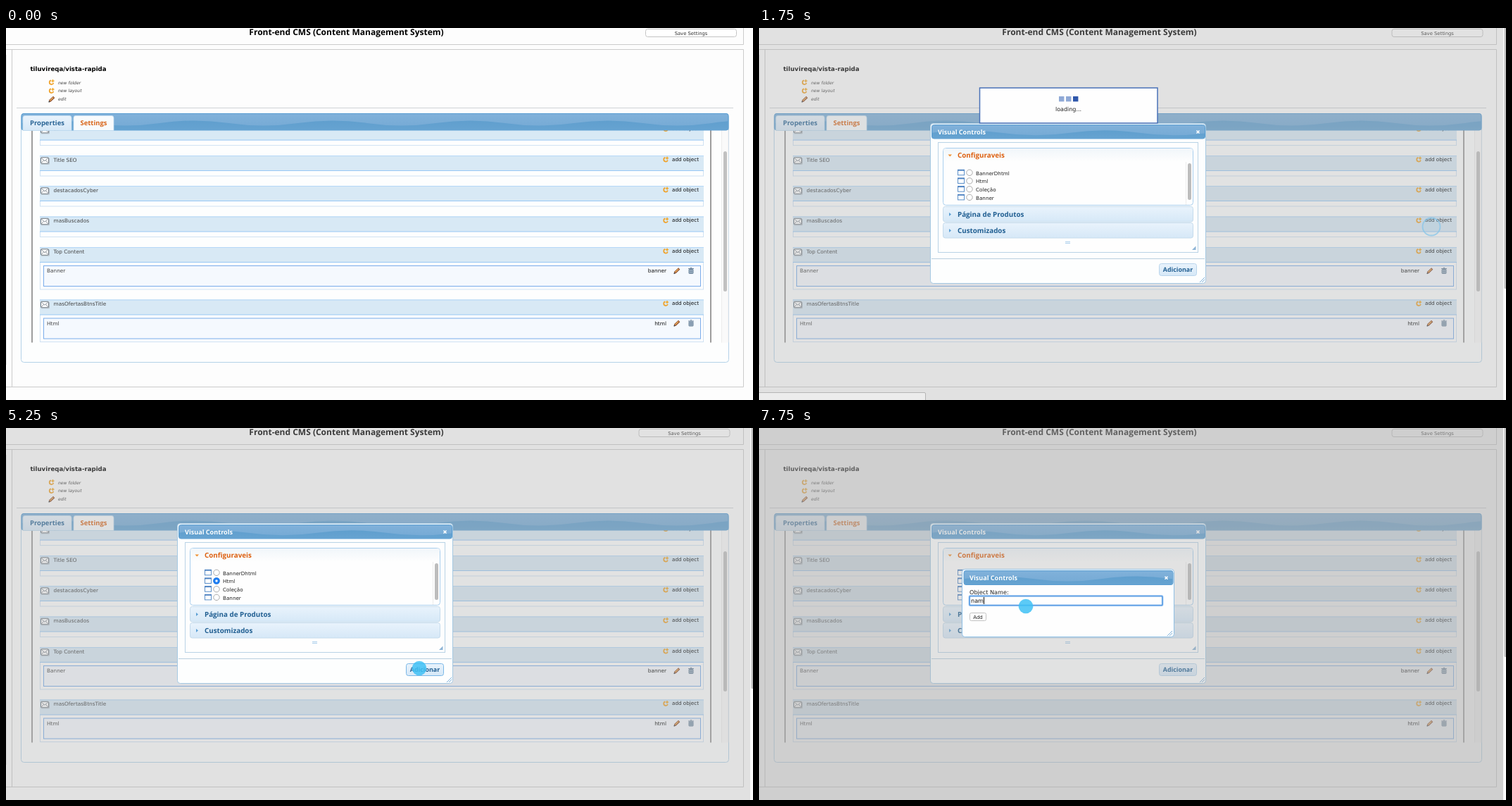
Recreate the animation shown at these times as an HTML page. Size 1061 by 528 pixels, loop 8000 ms.

```html
<!DOCTYPE html>
<html lang="en">
<head>
<meta charset="utf-8">
<title>CMS settings</title>
<style>
  html, body { margin: 0; width: 100%; height: 100%; overflow: hidden; background: #fdfdfd; }
  svg { display: block; }
  text { font-family: "DejaVu Sans", sans-serif; text-rendering: geometricPrecision; white-space: pre; }
  .b { font-weight: bold; }
  .i { font-style: italic; }
  .ui { font-family: "Open Sans", "Noto Sans", sans-serif; font-weight: bold; }
  .end { text-anchor: end; }
  .mid { text-anchor: middle; }
</style>
</head>
<body>
<svg id="stage" width="1061" height="528" viewBox="0 0 1061 528"></svg>
<script>
const LOOP = 8000, STEP = 250;

// Drawing helpers
const rect = (x, y, w, h, fill, stroke = 'none', r = 0, extra = '') =>
  `<rect x="${x}" y="${y}" width="${w}" height="${h}" rx="${r}" fill="${fill}" stroke="${stroke}" ${extra}/>`;
const path = (d, stroke, width = 1, fill = 'none') =>
  `<path d="${d}" fill="${fill}" stroke="${stroke}" stroke-width="${width}"/>`;
const text = (x, y, s, size, cls = '', fill = '#111', extra = '') =>
  `<text x="${x}" y="${y}" font-size="${size}" class="${cls}" fill="${fill}" ${extra}>${s}</text>`;
const at = (x, y, body) => `<g transform="translate(${x} ${y})">${body}</g>`;
const group = (id, body) => `<g id="${id}">${body}</g>`;

// Icons, centred on x, y
const spark = (x, y) => at(x, y,
  path('M-.6-2.6A2.9 2.9 0 1 0 2.9 1', '#f0a32c', 1.7) +
  path('M2-4V.2M-.1-1.9H4.1', '#f2a51f', 1.3));
const pencil = (x, y) => at(x, y,
  path('M-3.2 3L3.2-3', '#8a4a2c', 3.2) + path('M-2.6 2.2L2.3-2.4', '#f0b25e', 1.4) +
  path('M-4.3 4.2L-3 3', '#222', 1.4));
const trash = (x, y) => at(x, y,
  rect(-3, -2, 6, 6, '#a9bccd', '#6b8299', .6) + path('M-4-3H4M-1.2-4.2H1.2M-1-1V3M1-1V3', '#637c95', .9));
const mail = (x, y) => at(x, y,
  rect(-5.5, -4, 11, 8.5, '#fff', '#69727b', 1) + path('M-5-3.5L0 1L5-3.5M-5 4L-1.5 0M5 4L1.5 0', '#7b848d', .9) +
  path('M-5 5.4H6.3V-3', '#aab1b8', .8));
const cross = (x, y) => path(`M${x - 2} ${y - 2}l4 4m0-4l-4 4`, '#fff', 1.5);
const grip = (x, y) => path(`M${x - 4} ${y + 4}l7-7M${x - 1} ${y + 4}l4-4`, '#6fa8d6', .9);

// Blue title bar with a glossy wave
function bar(x, y, w, h) {
  let wave = `M0 ${h * .55}q49 -7 98 0`;
  for (let i = 98; i < w; i += 98) wave += 't98 0';
  return rect(x, y, w, h, 'url(#gloss)', '#5a9ed2', 3) +
    `<svg x="${x + .5}" y="${y + .5}" width="${w - 1}" height="${h - 1}">` +
    path(wave + `V${h}H0Z`, 'none', 0, 'url(#deep)') + '</svg>';
}

function section(y, name, item) {
  const hover = name === 'masBuscados' ? 'id="hot"' : '';
  let s = rect(48.5, y + .5, 942, item ? 59.5 : 28.5, '#fefefe', '#cfe2f3') +
    rect(48, y, 943, 21.5, '#d8e9f5') +
    path(`M48 ${y + .5}H991`, '#b5d8f8') + path(`M48 ${y + 21.5}H991`, '#98c8f5') +
    mail(55, y + 6.8) + text(67.5, y + 8.8, name, 7.35, '', '#444') +
    spark(937, y + 5.5) + text(984, y + 7.8, 'add object', 7.2, 'end', '#111', hover);
  if (item) {
    s += rect(53.5, y + 26.5, 933, 29, '#f5f9fe', '#79acea') +
      text(58, y + 36.3, item, 7.35, '', '#444') +
      text(938, y + 36.3, item.toLowerCase(), 7.4, 'end') +
      pencil(953, y + 33.5) + trash(973, y + 33.5);
  }
  return s;
}

const tab = (x, w, label, fill, ink) =>
  `<path d="M${x} 145.5v-18q0-3 3-3h${w - 6}q3 0 3 3v18z" fill="${fill}" stroke="#c0dcf0" stroke-width=".8"/>` +
  text(x + w / 2, 138, label, 9.45, 'ui mid', ink);

function page() {
  const frame = path('M0 23.5H1047.5V0M0 30.5H1047.5V509.5H0M8.5 30V509', '#cbcbcb') +
    path('M.5 38V478', '#e6e6e6') + path('M15 113.5H1033', '#cfd3d6');
  const head = text(483.5, 10.3, 'Front-end CMS (Content Management System)', 12, 'ui mid', '#000') +
    group('save', rect(908.5, 1.5, 129, 11, '#fff', '#c4c4c4', 3) +
      text(973, 9.6, 'Save Settings', 6.8, 'mid', '#333')) +
    text(34.5, 61, 'tiluvireqa/vista-rapida', 8.6, 'b', '#000') +
    spark(64.5, 77) + spark(64.5, 89) + pencil(65, 101) +
    ['new folder', 'new layout', 'edit'].map((s, i) => text(74, 79.6 + i * 11.8, s, 6.1, 'i', '#444')).join('');
  const rows = [[137.6, 'BP'], [181, 'Title SEO'], [224, 'destacadosCyber'], [267.5, 'masBuscados'],
    [311, 'Top Content', 'Banner'], [385.5, 'masOfertasBtnsTitle', 'Html']];
  const list = `<svg x="0" y="145" width="1061" height="301.5" viewBox="0 145 1061 301.5">` +
    rows.map(r => section(...r)).join('') +
    path('M37 145V447M1001 145V447', '#6b6b6b', 1.3) +
    rect(1016.5, 140, 9.5, 310, '#fafafa', '#ececec') +
    rect(1019, 175, 5, 199, '#c1c1c1', 'none', 2.5) + '</svg>';
  return rect(0, 0, 1061, 528, '#fdfdfd') + frame + head +
    rect(21.5, 121.5, 1005, 353, '#fdfefe', '#b4d2e8', 4) + list +
    bar(22, 121.5, 1004, 23.5) +
    tab(24, 69, 'Properties', 'url(#pale)', '#2a6596') + tab(96, 57, 'Settings', '#f8fbfd', '#d9661a');
}

const fold = (y, label) => rect(261.5, y, 355, 21.5, 'url(#pale)', '#c5dbec', 3) +
  path(`M270 ${y + 8.5}l3 2.5l-3 2.5z`, 'none', 0, '#5b9fd4') +
  text(282, y + 14, label, 9.8, 'ui', '#215f92');

function controls() {
  const options = ['BannerDhtml', 'Html', 'Coleção', 'Banner'].map((s, i) => {
    const y = 205.3 + i * 11.7;
    return rect(282.5, y - 4, 9, 7.5, '#fff', '#5b8fc9') + path(`M282 ${y - 3.4}h10`, '#4a7fc0', 1.6) +
      `<circle cx="299" cy="${y}" r="4.2" fill="#fff" stroke="#a3a3a3" stroke-width=".9"/>` +
      text(308, y + 3.2, s, 7.2, '', '#222');
  }).join('');
  return rect(243.5, 135.5, 391, 227, '#fdfefe', '#a6c9e2', 4) +
    bar(245.5, 137.5, 388, 19.5) + text(254, 151, 'Visual Controls', 9.1, 'ui', '#fff') + cross(623.5, 147.5) +
    rect(254.5, 162.5, 369, 156, '#fefefe', '#b9d3e6') +
    rect(261.5, 170.5, 355, 81, '#fefefe', '#a9cfee', 4) +
    rect(262, 171, 354, 19, 'url(#fade)', 'none', 3) +
    path('M268.5 179.5h5.5l-2.75 3z', 'none', 0, '#f09030') +
    text(282, 184.2, 'Configuraveis', 9.8, 'ui', '#dd6010') + options +
    path('M606.5 190V251', '#ececec') + rect(609, 192, 5, 52, '#bdbdbd', 'none', 2.5) +
    fold(253.5, 'Página de Produtos') + fold(276.5, 'Customizados') +
    path('M435 303.5h7M435 305.5h7', '#a9cdeb') + path('M615 315h5.5v-5.5z', 'none', 0, '#8db4d6') +
    path('M245 327.5H633', '#b9cfdf') +
    rect(568.5, 334.5, 53, 17, 'url(#pale)', '#b9d5ec', 3, 'id="addBtn"') +
    text(595, 346.2, 'Adicionar', 8.9, 'ui mid', '#215f92') + grip(630, 357) +
    group('picked', '<circle cx="299" cy="217" r="4.8" fill="#1d7df2"/><circle cx="299" cy="217" r="1.7" fill="#fff"/>');
}

function naming() {
  return rect(288.5, 200.5, 301, 96, '#fefefe', '#8fbfe4', 4) +
    bar(291, 202.5, 297, 20) + text(299, 216.3, 'Visual Controls', 9.1, 'ui', '#fff') + cross(578.5, 212.8) +
    text(299, 235.6, 'Object Name:', 8.15, '', '#222') +
    rect(298.7, 238.2, 274.6, 13.8, 'none', '#9cc6f2', 2, 'stroke-width="2.4"') +
    rect(299.3, 238.8, 273.4, 12.6, '#fafdb4', '#4b93e0', .5, 'id="field" stroke-width="1.3"') +
    text(301, 248, '', 8.1, '', '#111', 'id="typed"') +
    '<path id="caret" d="M.5 240V250" stroke="#111"/>' +
    rect(299.5, 262.5, 23, 11, '#fff', '#c2c2c2', 2) + text(311, 270.8, 'Add', 7, 'mid', '#222') + grip(584, 291);
}

const loading = () => rect(313.5, 85, 252.5, 50, '#fefefe', '#4a72b8', 0, 'stroke-width="1.5"') +
  [426, 436, 446].map(x => rect(x, 97, 7.4, 7.4, '#8fa9d6', 'none', 0, 'class="dot"')).join('') +
  text(439.5, 118, 'loading...', 8, 'mid', '#222');

const shade = id => rect(0, 0, 1057, 528, '#aaa', 'none', 0, `id="${id}" opacity=".34"`);

const gradient = (id, a, b) => `<linearGradient id="${id}" x2="0" y2="1"><stop stop-color="${a}"/>` +
  `<stop offset="1" stop-color="${b}"/></linearGradient>`;

stage.innerHTML = '<defs>' + gradient('gloss', '#80b1da', '#74a9d4') + gradient('deep', '#609fce', '#66a3d1') +
  gradient('pale', '#e9f3fc', '#d6e8f7') + gradient('fade', '#f1f6fa', '#fefefe') + '</defs>' +
  page() + shade('dim1') + group('controls', controls()) + shade('dim2') + group('naming', naming()) +
  group('loading', loading()) +
  group('scroll', rect(1057, 0, 4, 528, '#fafafa') + rect(1058.5, -4, 4, 374, '#bcbcbc', 'none', 1.5, 'id="thumb"')) +
  group('status', rect(-2, 517.5, 238.5, 14, '#ececec', '#b4b4b4', 1.5)) +
  '<circle id="ring" r="12.5" fill="#8fd0f2" fill-opacity=".12" stroke="#86c6ea" stroke-opacity=".75" stroke-width="1.8"/>' +
  '<circle id="cursor" r="10.3" fill="#40c1f5" opacity=".85"/>';

// Pointer way: time, x, y
const way = [[250, 880, 512], [1000, 958, 256], [1250, 955, 273], [1750, 955, 273], [2500, 322, 203],
  [3000, 309, 217], [3500, 297, 231], [3750, 298, 216], [4000, 298, 216], [5000, 587, 350],
  [5250, 587, 341], [5500, 587, 341], [6500, 379, 253], [LOOP, 379, 253]];
const clicks = [[1500, 2000, 955, 282], [4000, 4250, 298, 225], [5500, 5750, 587, 350]];

const $ = id => document.getElementById(id);
const show = (id, on) => $(id).style.display = on ? '' : 'none';
const set = (id, attrs) => { for (const k in attrs) $(id).setAttribute(k, attrs[k]); };
const dots = document.querySelectorAll('.dot');

function pointer(t) {
  const i = way.findIndex(p => p[0] > t), [t0, x0, y0] = way[i - 1], [t1, x1, y1] = way[i];
  const k = (t - t0) / (t1 - t0), e = k * k * (3 - 2 * k);
  return { cx: x0 + (x1 - x0) * e, cy: y0 + (y1 - y0) * e };
}

function draw(t) {
  const open = t >= 1750, named = t >= 5500;
  const click = clicks.find(c => t >= c[0] && t < c[1]);
  for (const id of ['dim1', 'controls', 'scroll']) show(id, open);
  for (const id of ['dim2', 'naming']) show(id, named);
  show('loading', open && t < 2500);
  show('status', t >= 1250 && t < 2000);
  show('picked', t >= 4000);
  set('save', { transform: `translate(${open ? -9.5 : 0} 0)` });
  set('hot', { fill: t >= 1250 && !open ? '#8a9299' : '#111' });
  set('addBtn', { stroke: t >= 5000 && t < 5500 ? '#79b7e7' : '#b9d5ec' });
  set('thumb', { height: named ? 329 : 374 });
  dots.forEach((d, i) => d.setAttribute('fill', i === (t / STEP + 1) % 3 ? '#2f57ab' : '#8fa9d6'));

  show('ring', click);
  show('cursor', t >= 250 && !click);
  if (click) set('ring', { cx: click[2], cy: click[3] });
  else if (t >= 250) set('cursor', pointer(t));

  const count = Math.max(0, Math.min(3, (t - 7000) / STEP));
  $('typed').textContent = 'nam'.slice(0, count);
  set('field', { fill: count ? '#fefefe' : '#fafdb4' });
  const end = count ? $('typed').getComputedTextLength() : 0;
  set('caret', { transform: `translate(${301 + Math.round(end)} 0)` });
  show('caret', t < 6500 || t >= 7000);
}

const start = performance.now();
let last = -1;
function tick() {
  const t = Math.floor((performance.now() - start) % LOOP / STEP) * STEP;
  if (t !== last) draw(last = t);
  requestAnimationFrame(tick);
}
tick();
</script>
</body>
</html>
```
